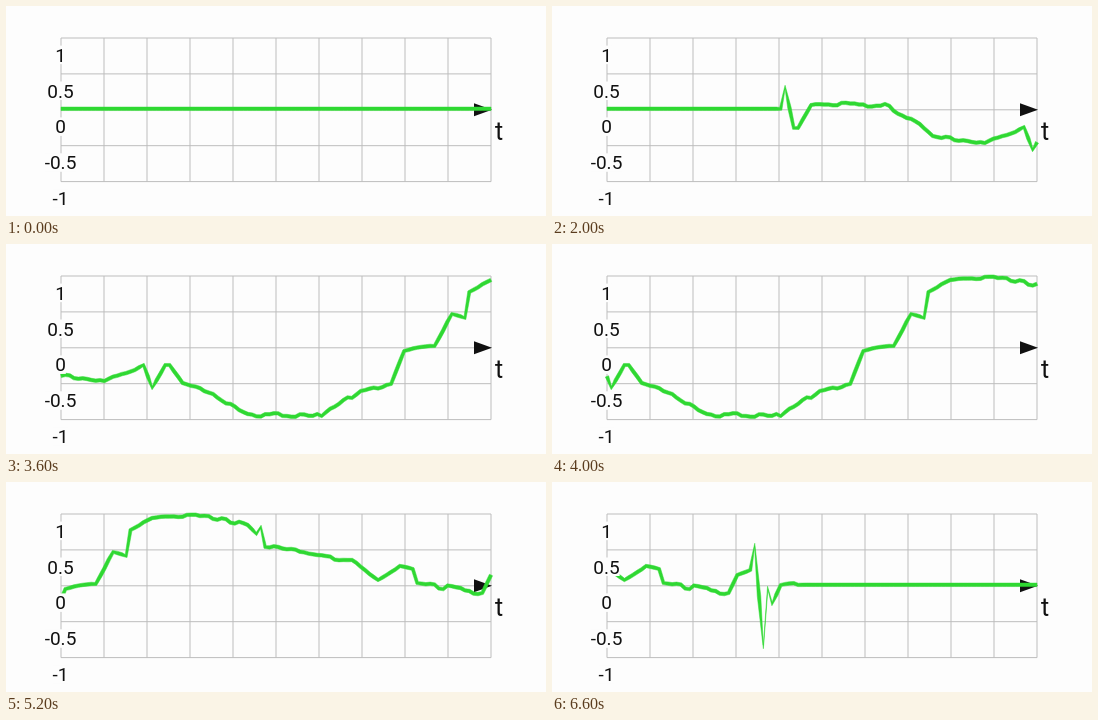
An HTML page with a canvas that plays this animation: 540 by 210 pixels, repeating every 6.7 s.

```html
<!DOCTYPE html>
<html lang="en">
<head>
<meta charset="utf-8">
<title>Scrolling signal</title>
<style>
  html, body { margin: 0; width: 540px; height: 210px; overflow: hidden; background: #fdfdfd; }
  canvas { display: block; }
</style>
</head>
<body>
<canvas id="stage" width="540" height="210"></canvas>
<script>
const ctx = document.getElementById('stage').getContext('2d');
const BG = '#fdfdfd', INK = '#111', GREEN = '#2fd832';
const LEFT = 55, TOP = 32, COL = 43, ROW = 35.9, COLS = 10, ROWS = 4;
const RIGHT = LEFT + COL * COLS, BOTTOM = TOP + ROW * ROWS;
const LOOP = 6700, STEP = 100, POINTS = 100, SPEED = 4.87, REST = 102.8;
const HALF_PEN = 1.75, NOISE = 5;

// Turning points of the signal: [sample, height].
const turns = [
  [0, REST], [1, 81], [3, 122], [4, 122], [7, 99], [24, 98], [32, 118], [35, 130],
  [47, 137], [54, 126], [56, 121], [58, 144], [61, 121], [62, 121], [65, 139],
  [72, 150], [80, 170], [97, 172], [106, 147], [113, 140], [116, 107], [123, 102],
  [127, 70], [130, 74], [131, 48], [136, 36], [147, 34], [158, 43], [160, 52],
  [161, 45], [162, 65], [174, 73], [182, 78], [188, 98], [193, 84], [196, 87],
  [197, 101], [212, 111], [214, 93], [217, 88], [218, 63], [220, 165], [221, 106],
  [222, 122], [224, 103], [231, REST]
];

function random(seed) {
  const v = Math.sin(seed * 12.9898) * 43758.5453;
  return v - Math.floor(v);
}

// Straight between turns, roughened by noise that fades out at both ends.
function signal(i) {
  const next = turns.findIndex(([x]) => x >= i);
  if (next < 1) return REST;
  const [x0, y0] = turns[next - 1], [x1, y1] = turns[next];
  const fade = Math.min(1, (i - x0) * (x1 - i) / 16);
  return y0 + (y1 - y0) * (i - x0) / (x1 - x0) + fade * NOISE * (random(i >> 1) - 0.5);
}

function drawGrid() {
  ctx.strokeStyle = '#bdbdbd';
  ctx.lineWidth = 1;
  ctx.beginPath();
  for (let c = 0; c <= COLS; c++) {
    ctx.moveTo(LEFT + c * COL, TOP);
    ctx.lineTo(LEFT + c * COL, BOTTOM);
  }
  for (let r = 0; r <= ROWS; r++) {
    ctx.moveTo(LEFT, TOP + r * ROW);
    ctx.lineTo(RIGHT, TOP + r * ROW);
  }
  ctx.stroke();

  const axis = TOP + 2 * ROW;
  ctx.fillStyle = INK;
  ctx.beginPath();
  ctx.moveTo(468, axis - 6.5);
  ctx.lineTo(486, axis);
  ctx.lineTo(468, axis + 6.5);
  ctx.fill();
}

function unit(a, b) {
  const dx = b[0] - a[0], dy = b[1] - a[1], len = Math.hypot(dx, dy) || 1;
  return [dx / len, dy / len];
}

// A ribbon whose edges follow the averaged direction at each point, so sharp tips get thin.
function drawSignal(start) {
  const pts = Array.from({ length: POINTS }, (_, n) =>
    [LEFT + n * (RIGHT - LEFT) / (POINTS - 1), signal(start + n)]);
  const upper = [], lower = [];
  pts.forEach((p, n) => {
    const before = unit(pts[n - 1] ?? p, p);
    const after = unit(p, pts[n + 1] ?? p);
    const [tx, ty] = unit([0, 0], [before[0] + after[0], before[1] + after[1]]);
    upper.push([p[0] + ty * HALF_PEN, p[1] - tx * HALF_PEN]);
    lower.unshift([p[0] - ty * HALF_PEN, p[1] + tx * HALF_PEN]);
  });
  ctx.beginPath();
  for (const [x, y] of upper.concat(lower)) ctx.lineTo(x, y);
  ctx.closePath();
  ctx.fillStyle = ctx.strokeStyle = GREEN;
  ctx.lineWidth = 0.5;
  ctx.lineJoin = 'round';
  ctx.fill();
  ctx.stroke();
}

function drawLabels() {
  ctx.textAlign = 'center';
  ctx.font = '19px Roboto, sans-serif';
  ['1', '0.5', '0', '-0.5', '-1'].forEach((text, row) => {
    const base = 55.6 + row * ROW, width = ctx.measureText(text).width;
    ctx.fillStyle = BG;
    ctx.fillRect(54.5 - width / 2, base - 16, width, 18.5);
    ctx.fillStyle = INK;
    ctx.fillText(text, 54.5, base);
  });
  ctx.font = '25px Roboto, sans-serif';
  ctx.fillText('t', 493, 133.6);
}

function draw() {
  const tick = Math.floor(performance.now() % LOOP / STEP);
  ctx.fillStyle = BG;
  ctx.fillRect(0, 0, 540, 210);
  drawGrid();
  drawSignal(Math.floor(SPEED * (tick - 20)) - 40);
  drawLabels();
  requestAnimationFrame(draw);
}
draw();
</script>
</body>
</html>
```
